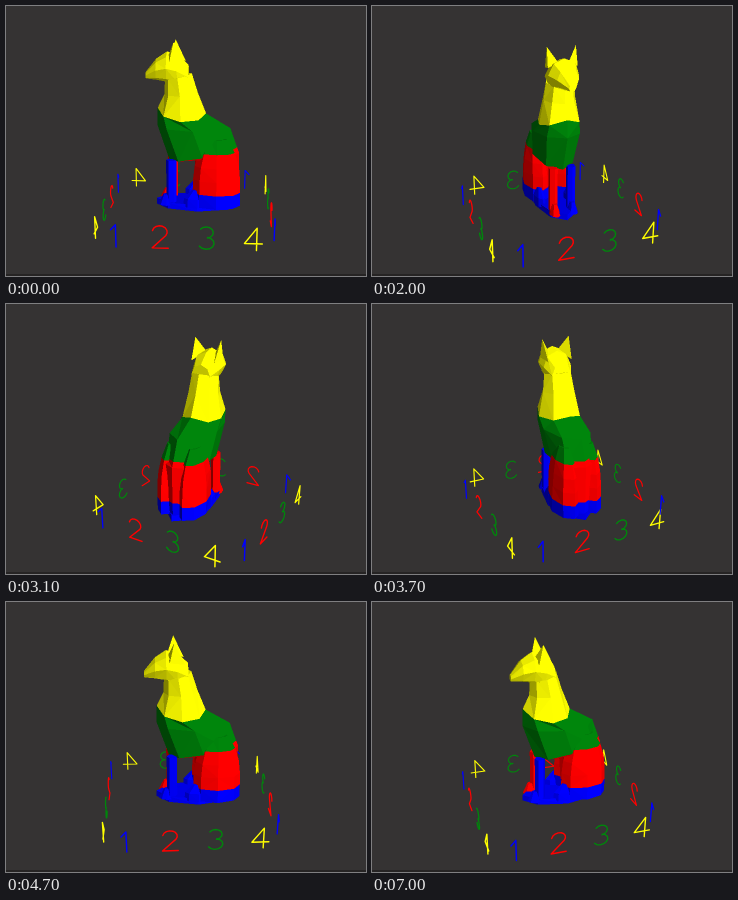
These frames come from a looping animation (360 by 270 pixels, 7.2 s). An HTML page with a canvas:

```html
<!DOCTYPE html>
<html lang="en">
<head>
<meta charset="utf-8">
<title>Turning cat</title>
<style>
html, body { margin: 0; width: 100%; height: 100%; overflow: hidden; background: #353333; }
canvas { display: block; width: 360px; height: 270px; }
</style>
</head>
<body>
<canvas id="stage" width="360" height="270"></canvas>
<script>
const W = 360, H = 270, LOOP = 7200, STEP = 100, SS = 2;
const RAD = Math.PI / 180;
const ctx = document.getElementById('stage').getContext('2d');
const COLORS = { b: [0, 0, 255], r: [255, 0, 0], g: [0, 134, 12], y: [255, 255, 0] };
const LIGHT = [0.4, 0.28, 0.87];
const PIVOT_HEIGHT = 1.65, SWAY = .17;

// ---- camera ----
const TURN = [[500, -3.5], [1400, 41], [2500, 172], [3700, 296.5], [4700, 363], [5400, 377.5]];

// Smooth curve through the points, at rest at both ends
function turnAt(t) {
  const last = TURN.length - 1;
  t = Math.min(Math.max(t, TURN[0][0]), TURN[last][0]);
  let i = 0;
  while (i < last - 1 && t > TURN[i + 1][0]) i++;
  const slope = j => j === 0 || j === last ? 0
    : (TURN[j + 1][1] - TURN[j - 1][1]) / (TURN[j + 1][0] - TURN[j - 1][0]);
  const [t0, a] = TURN[i], [t1, b] = TURN[i + 1];
  const d = t1 - t0, s = (t - t0) / d;
  return a + (b - a) * s * s * (3 - 2 * s)
    + d * s * (1 - s) * ((1 - s) * slope(i) - s * slope(i + 1));
}

// The view tips downward as the cat turns
function viewAt(t) {
  const turn = turnAt(t), first = TURN[0][1], total = TURN[TURN.length - 1][1] - first;
  const pitch = 15 + 9.5 * ((turn - first) / total) ** .75;
  return { turn: turn * RAD, pitch: pitch * RAD };
}

// Camera-space point: x right, y up, z toward the viewer; the axis lies beside the pivot
function toCamera([x, y, z], { turn, pitch }, extra = 0) {
  const c = Math.cos(turn + extra), s = Math.sin(turn + extra);
  const cp = Math.cos(pitch), sp = Math.sin(pitch);
  const right = x * c + z * s + SWAY * (1 + Math.cos(turn - 225 * RAD));
  const depth = z * c - x * s + SWAY * Math.cos(turn - 135 * RAD);
  const up = y - PIVOT_HEIGHT;
  return [right, up * cp - depth * sp, depth * cp + up * sp];
}

function toScreen([x, y, z]) {
  const k = 42 / (1 - .07 * z);
  return [W / 2 + k * x, H / 2 - k * y, k];
}

// ---- cat mesh ----
const faces = [];
const face = (color, ...points) => faces.push({ color, points });

// Skin over rings; a ring spans two points of the side profile: [x1, y1, x2, y2, half width, sag]
function loft(rings, colors, side = 0, n = 8) {
  const loops = rings.map(([x1, y1, x2, y2, w, sag = 0], r) =>
    Array.from({ length: n }, (_, i) => {
      const a = (i / n) * 2 * Math.PI, m = (1 - Math.cos(a)) / 2, wide = Math.sin(a);
      const rough = 1 + .05 * Math.sin(r * 7.3 + i * 4.1);
      return [x1 + (x2 - x1) * m, y1 + (y2 - y1) * m + sag * Math.abs(wide), side + w * wide * rough];
    }));
  const cap = (ring, loop, color) => {
    const mid = [(ring[0] + ring[2]) / 2, (ring[1] + ring[3]) / 2, side];
    loop.forEach((p, i) => face(color, p, loop[(i + 1) % n], mid));
  };
  const end = rings.length - 1;
  cap(rings[0], loops[0], colors[0]);
  cap(rings[end], loops[end], colors[end - 1]);
  for (let r = 0; r < end; r++) for (let i = 0; i < n; i++) {
    const j = (i + 1) % n, quad = [loops[r][i], loops[r][j], loops[r + 1][j], loops[r + 1][i]];
    const k = (i + r) % 2;
    face(colors[r], quad[k], quad[k + 1], quad[k + 2]);
    face(colors[r], quad[k], quad[k + 2], quad[(k + 3) % 4]);
  }
}

const steps = (count, make) => Array.from({ length: count + 1 }, (_, i) => make(i / count));

// Upright lump that narrows toward its top
function lump(x0, x1, y0, y1, width, side, colors) {
  const mid = (x0 + x1) / 2, half = (x1 - x0) / 2;
  loft(steps(colors.length, u => {
    const f = Math.cos(1.15 * u * u), y = y0 + (y1 - y0) * u;
    return [mid - half * f, y, mid + half * f, y, width * f];
  }), colors, side);
}

function buildCat() {
  const plinth = y => [-.78, y, 1.26, y, .46];
  loft([plinth(0), plinth(.15)], 'b');
  // body and neck, from seat to jaw
  loft([
    [.3, .1, 1.2, .1, .36], [.2, .45, 1.22, .45, .42], [.15, 1.25, 1.22, 1.35, .46],
    [-.46, 1.15, 1.17, 1.48, .46], [-.74, 2, 1, 1.95, .54],
    [-.73, 2.42, .42, 2.3, .5, -.16], [-.57, 2.75, .22, 2.8, .38], [-.55, 3.12, .08, 3.25, .33]
  ], 'brrggyy');
  // head, from nose to nape
  loft(steps(4, u => {
    const x = u - 1, mid = 3.2 + .2 * Math.sin(Math.PI * u), half = .08 + .29 * Math.sin(.8 * Math.PI * u);
    return [x, mid - half, x, mid + half, half];
  }), 'yyyy');
  for (const s of [-1, 1]) {
    const tip = [-.32, 4, s * .34];
    const base = [[-.46, 3.66, s * .12], [-.42, 3.55, s * .35], [-.08, 3.5, s * .3]];
    base.forEach((p, i) => face('y', p, base[(i + 1) % 3], tip));
    // front leg and paw
    const color = s > 0 ? 'b' : 'r', legRing = y => [-.52, y, -.27, y, .11];
    loft([legRing(.1), legRing(1.2)], color, s * .22, 6);
    lump(-.72, -.3, .08, .34, .13, s * .22, color);
    // haunch and hind foot
    lump(.12, 1.26, .1, 1.75, .3, s * .29, 'brrrg');
    lump(-.1, .6, .08, .5, .13, s * .36, 'bb');
  }
}
buildCat();

// ---- depth-buffered flat shading ----
const bw = W * SS, bh = H * SS;
const layer = document.createElement('canvas');
layer.width = bw;
layer.height = bh;
const layerCtx = layer.getContext('2d');
const image = layerCtx.createImageData(bw, bh);
const pixels = new Uint32Array(image.data.buffer);
const depths = new Float32Array(bw * bh);

function shade(color, [a, b, c]) {
  const u = b.map((v, i) => v - a[i]), w = c.map((v, i) => v - a[i]);
  const normal = [u[1] * w[2] - u[2] * w[1], u[2] * w[0] - u[0] * w[2], u[0] * w[1] - u[1] * w[0]];
  const size = (Math.hypot(...normal) || 1) * (normal[2] < 0 ? -1 : 1);
  const lit = normal.reduce((sum, v, i) => sum + v * LIGHT[i], 0) / size;
  const level = Math.min(1, .5 + .65 * Math.max(0, lit));
  const [red, green, blue] = COLORS[color].map(v => Math.round(v * level));
  return (255 << 24 | blue << 16 | green << 8 | red) >>> 0;
}

function fillTriangle([a, b, c], color) {
  const area = (b[0] - a[0]) * (c[1] - a[1]) - (b[1] - a[1]) * (c[0] - a[0]);
  if (Math.abs(area) < 1e-6) return;
  const range = (i, max) => [
    Math.max(0, Math.floor(Math.min(a[i], b[i], c[i]))),
    Math.min(max - 1, Math.ceil(Math.max(a[i], b[i], c[i])))];
  const [x0, x1] = range(0, bw), [y0, y1] = range(1, bh);
  for (let y = y0; y <= y1; y++) for (let x = x0; x <= x1; x++) {
    const px = x + .5 - a[0], py = y + .5 - a[1];
    const v = (px * (c[1] - a[1]) - py * (c[0] - a[0])) / area;
    const w = (py * (b[0] - a[0]) - px * (b[1] - a[1])) / area;
    if (v < 0 || w < 0 || v + w > 1) continue;
    const z = a[2] + v * (b[2] - a[2]) + w * (c[2] - a[2]), at = y * bw + x;
    if (z > depths[at]) {
      depths[at] = z;
      pixels[at] = color;
    }
  }
}

function drawCat(view) {
  pixels.fill(0);
  depths.fill(0);
  for (const { color, points } of faces) {
    const cam = points.map(p => toCamera(p, view));
    const flat = cam.map(p => {
      const [x, y, k] = toScreen(p);
      return [x * SS, y * SS, k];
    });
    fillTriangle(flat, shade(color, cam));
  }
  layerCtx.putImageData(image, 0, 0);
  ctx.drawImage(layer, 0, 0, W, H);
}

// ---- numerals: four on each side of a square ----
const arc = (cy, rx, ry, from, to) => steps(8, u => {
  const a = (from + (to - from) * u) * RAD;
  return [rx * Math.cos(a), cy + ry * Math.sin(a)];
});
const NUMERALS = [
  ['b', [[-.07, .14], [.04, .26], [.04, -.26]]],
  ['r', [...arc(.12, .16, .14, 170, -35), [-.17, -.26], [.18, -.26]]],
  ['g', [...arc(.13, .15, .13, 145, -80), ...arc(-.12, .17, .14, 80, -150)]],
  ['y', [[.08, -.26], [.08, .26], [-.18, -.1], [.2, -.1]]]
];

function drawNumerals(view, inFront) {
  for (let side = 0; side < 4; side++) NUMERALS.forEach(([color, stroke], i) => {
    const place = (x, y) => toCamera([i - 1.5 + x, y, 2], view, side * Math.PI / 2);
    const middle = place(0, 0), axis = toCamera([0, 0, 0], view);
    if (middle[2] > axis[2] !== inFront) return;
    ctx.beginPath();
    for (const [x, y] of stroke) {
      const [sx, sy] = toScreen(place(x, y));
      ctx.lineTo(sx, sy);
    }
    ctx.strokeStyle = `rgb(${COLORS[color]})`;
    ctx.lineWidth = toScreen(middle)[2] * .031;
    ctx.stroke();
  });
}

function draw(t) {
  const view = viewAt(t);
  ctx.fillStyle = '#353333';
  ctx.fillRect(0, 0, W, H);
  ctx.fillStyle = '#262424';
  ctx.fillRect(0, 268, W, 2);
  drawNumerals(view, false);
  drawCat(view);
  drawNumerals(view, true);
}

ctx.lineJoin = ctx.lineCap = 'round';
const start = performance.now();
let shown = -1;
function tick() {
  const t = Math.floor(((performance.now() - start) % LOOP) / STEP) * STEP;
  if (t !== shown) draw(shown = t);
  requestAnimationFrame(tick);
}
tick();
</script>
</body>
</html>
```
